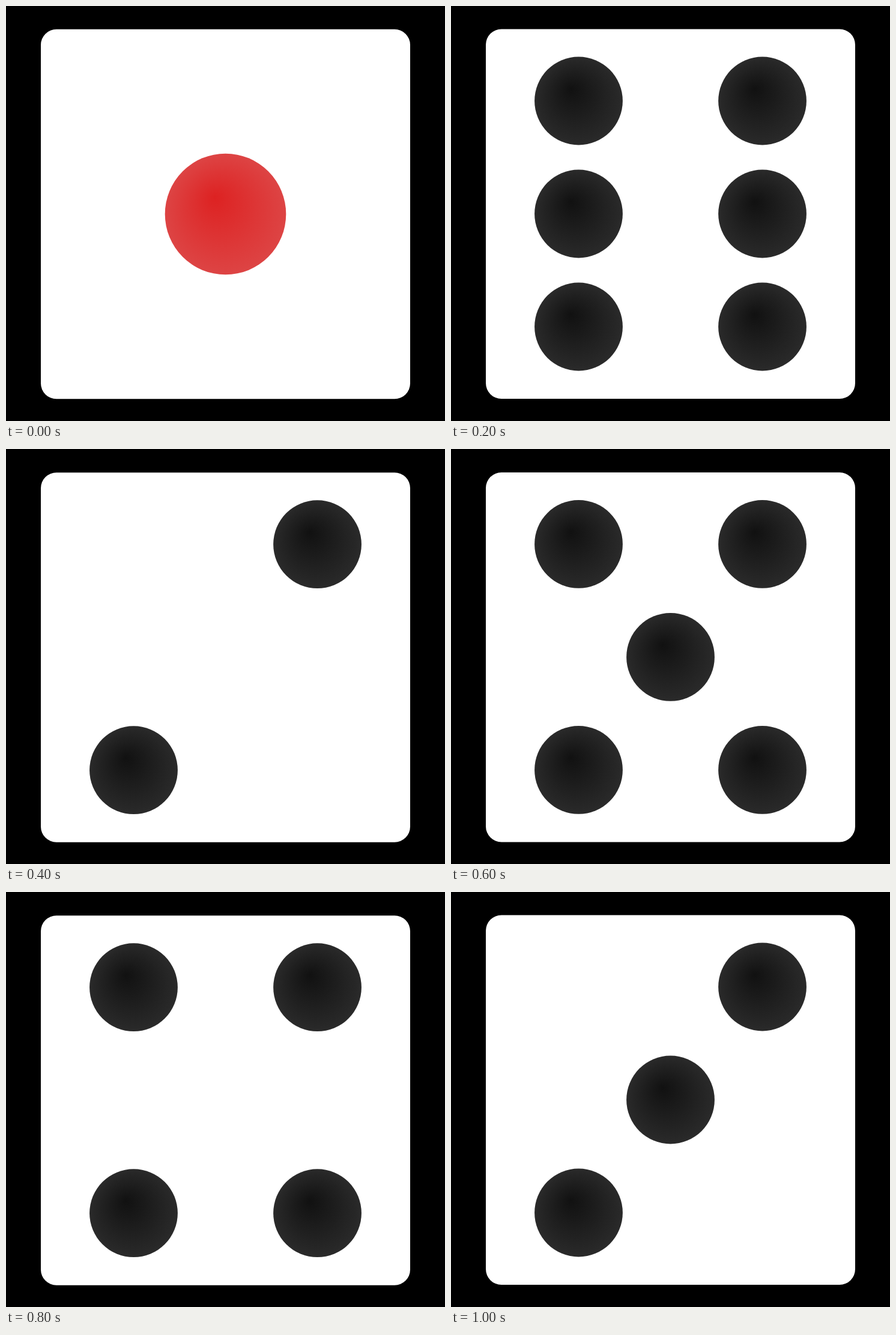
An HTML page for the animation above (1.2 s loop, 731 by 691 pixels).

```html
<!DOCTYPE html>
<html lang="en">
<head>
<meta charset="utf-8">
<title>Rolling die</title>
<style>
  html, body { margin: 0; width: 100%; height: 100%; overflow: hidden; background: #000; }
  svg { display: block; width: 731px; height: 691px; overflow: hidden; }
  .strip { animation: roll 1200ms steps(6, end) infinite; }
  @keyframes roll { to { transform: translateX(-4386px); } }
</style>
</head>
<body>
<svg viewBox="0 0 731 691">
  <defs>
    <radialGradient id="ink" fx=".41" fy=".36">
      <stop stop-color="#111"/>
      <stop offset="1" stop-color="#2a2a2a"/>
    </radialGradient>
    <radialGradient id="red" fx=".41" fy=".36">
      <stop stop-color="#dd2222"/>
      <stop offset="1" stop-color="#dd4444"/>
    </radialGradient>
    <rect id="card" x="58" y="38.5" width="615" height="615.5" rx="26" fill="#fff"/>
    <circle id="pip" r="73.4" fill="url(#ink)"/>
    <g id="two">
      <use href="#pip" x="518.5" y="158"/>
      <use href="#pip" x="212.5" y="534"/>
    </g>
    <g id="four">
      <use href="#two"/>
      <use href="#pip" x="212.5" y="158"/>
      <use href="#pip" x="518.5" y="534"/>
    </g>
    <use id="mid" href="#pip" x="365.5" y="346"/>
  </defs>

  <!-- Six faces side by side, one stage width apart -->
  <g class="strip">
    <g transform="translate(0 .3)">
      <use href="#card"/>
      <circle cx="365.5" cy="346.2" r="100.8" fill="url(#red)"/>
    </g>
    <g transform="translate(731 0)">
      <use href="#card"/>
      <use href="#four"/>
      <use href="#pip" x="212.5" y="346"/>
      <use href="#pip" x="518.5" y="346"/>
    </g>
    <g transform="translate(1462 .7)">
      <use href="#card"/>
      <use href="#two"/>
    </g>
    <g transform="translate(2193 .4)">
      <use href="#card"/>
      <use href="#four"/>
      <use href="#mid"/>
    </g>
    <g transform="translate(2924 .7)">
      <use href="#card"/>
      <use href="#four"/>
    </g>
    <g transform="translate(3655 0)">
      <use href="#card"/>
      <use href="#two"/>
      <use href="#mid"/>
    </g>
  </g>
</svg>
</body>
</html>
```
